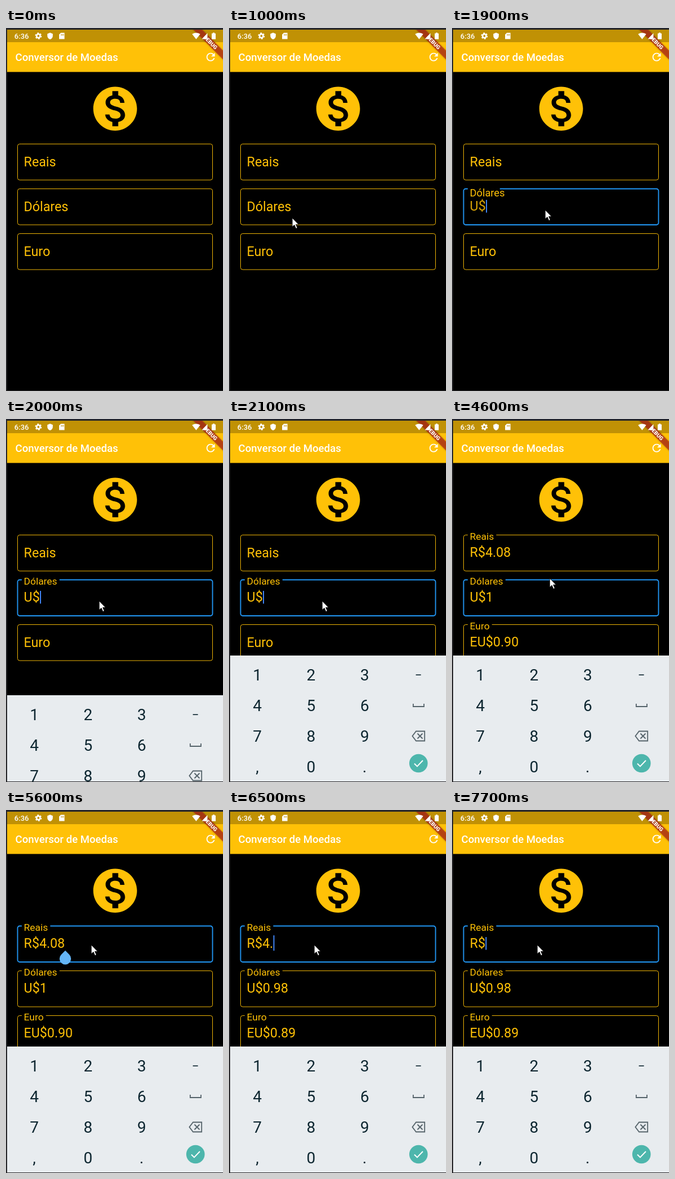
Recreate the animation shown at these times as an HTML page. Size 384x640 px, loop 8000 ms.

```html
<!DOCTYPE html>
<html lang="pt">
<head>
<meta charset="utf-8">
<title>Conversor de Moedas</title>
<style>
  html, body { margin: 0; width: 100%; height: 100%; overflow: hidden; background: #000; }
  svg { display: block; width: 100%; height: 100%; font-family: Roboto, sans-serif; }
  .field text { font-size: 23.2px; fill: #ffc107; }
  .key { font-size: 28px; fill: #0d2630; text-anchor: middle; }
  .line { fill: none; stroke: #55636a; stroke-width: 1.8; }
</style>
</head>
<body>
<svg id="stage" viewBox="0 0 384 640">
  <rect width="384" height="640"/>
  <rect y="25" width="384" height="52.5" fill="#ffc107"/>
  <rect y="3" width="384" height="22" fill="#c09105"/>
  <text x="16.6" y="58" font-size="18.57" font-weight="500" fill="#fff">Conversor de Moedas</text>
  <path transform="translate(351 40) scale(.9286)" fill="#fff" d="M17.65 6.35C16.2 4.9 14.21 4 12 4c-4.42 0-7.99 3.58-7.99 8s3.57 8 7.99 8c3.73 0 6.84-2.55 7.73-6h-2.08c-.82 2.33-3.04 4-5.65 4-3.31 0-6-2.69-6-6s2.69-6 6-6c1.66 0 3.14.69 4.22 1.78L13 11h7V4z"/>
  <path transform="translate(146.7 95.8) scale(3.869)" fill="#ffc107" d="M12 2C6.48 2 2 6.48 2 12s4.48 10 10 10 10-4.48 10-10S17.52 2 12 2zm1.41 16.09V20h-2.67v-1.93c-1.71-.36-3.16-1.46-3.27-3.4h1.96c.1 1.05.82 1.87 2.65 1.87 1.96 0 2.4-.98 2.4-1.59 0-.83-.44-1.61-2.67-2.14-2.48-.6-4.18-1.62-4.18-3.67 0-1.72 1.39-2.84 3.11-3.21V4h2.67v1.95c1.86.45 2.79 1.86 2.85 3.39H14.3c-.05-1.11-.64-1.87-2.22-1.87-1.5 0-2.4.68-2.4 1.64 0 .84.65 1.39 2.67 1.91s4.18 1.39 4.18 3.91c-.02 1.83-1.38 2.83-3.12 3.16z"/>

  <g id="fields"></g>
  <rect id="caret" width="1.9" fill="#448aff"/>
  <path id="handle" fill="#64b5f6" d="M104.9 247.8l7.2 7.2a10.2 10.2 0 1 1-14.4 0z"/>

  <g id="keyboard">
    <rect y="417" width="384" height="223" fill="#e8ecef"/>
    <g id="keys"></g>
    <path class="line" d="M326 502v5h19v-5"/>
    <path class="line" d="M331 550.5H346.2V567.5H331L324.5 559ZM333.5 554.5l9 9m0-9l-9 9"/>
    <circle cx="335.3" cy="607" r="16.3" fill="#4db6ac"/>
    <path d="M328 607.5l5 5 10-10.5" fill="none" stroke="#fff" stroke-width="1.9"/>
  </g>

  <g transform="translate(384 3) rotate(45) scale(.9286)">
    <rect x="-45" y="28" width="90" height="12" fill="#000" opacity=".3" style="filter:blur(2px)"/>
    <rect x="-45" y="28" width="90" height="12" fill="#b71c1c" fill-opacity=".63"/>
    <text y="37.6" font-size="10.2" font-weight="900" text-anchor="middle" fill="#fff">DEBUG</text>
  </g>
  <g fill="#fff">
    <text x="14.8" y="19" font-size="13" font-weight="500">6:36</text>
    <circle cx="57.3" cy="14" r="3.2" fill="none" stroke="#fff" stroke-width="2.6"/>
    <circle cx="57.3" cy="14" r="5" fill="none" stroke="#fff" stroke-width="1.9" stroke-dasharray="2.6 2.636"/>
    <path d="M78 8.3l4.8 2v3.6c0 3-2 5.2-4.8 6-2.800-.8-4.800-3-4.800-6v-3.600z"/>
    <path fill-rule="evenodd" d="M97 8.500h6.500v11h-9.500v-8zm.2 2.500v2.300h1.100v-2.300zm2 0v2.300h1.100v-2.300zm2 0v2.300h1.100v-2.300z"/>
    <path d="M336.500 19.800L329.300 10.800Q336.500 6 343.700 10.800Z"/>
    <path d="M346.500 19.500H356.500V9Z"/>
    <path d="M364 9.500h2v-1.300h3v1.300h2v10.300h-7z"/>
  </g>

  <path id="mouse" fill="#fff" stroke="#000" stroke-width=".8" d="M0 0V15.500L3.700 12.200 6.500 18.500 9 17.400 6.200 11.300H11Z"/>
  <path d="M0 0H384V3H2V639H384V640H0Z" fill="#262629"/>
</svg>
<script>
const LOOP = 8000, STEP = 100, LEFT = 31.6;
const NS = 'http://www.w3.org/2000/svg';
const $ = id => document.getElementById(id);
const clamp = v => Math.max(0, Math.min(1, v));
const within = (t, spans) => spans.some(([a, b]) => t >= a && t < b);

function add(parent, tag, attrs = {}, text = '') {
  const el = document.createElementNS(NS, tag);
  set(el, attrs);
  el.textContent = text;
  return parent.appendChild(el);
}
function set(el, attrs) {
  for (const k in attrs) el.setAttribute(k, attrs[k]);
}
// last [time, value] entry that has been reached
function at(list, t) {
  let value = list[0][1];
  for (const [time, v] of list) if (t >= time) value = v;
  return value;
}

['123−', '456', '789', ',0.'].forEach((row, r) =>
  [...row].forEach((c, i) =>
    add($('keys'), 'text', { class: 'key', x: 50 + 95 * i, y: 461 + 54 * r }, c)));
set($('keys').children[3], { 'font-size': 24, style: 'font-size:22px', y: 459 });

const fields = [
  { label: 'Reais', prefix: 'R$', top: 204.5, float: 3085, focus: [5180, LOOP],
    values: [[0, ''], [3100, '4.08'], [6300, '4.0'], [6500, '4.'], [6700, '4'], [7000, '']],
    blink: [[5200, 5600], [6100, 7200], [7700, LOOP]] },
  { label: 'Dólares', prefix: 'U$', top: 283.5, float: 1786, focus: [1786, 5180],
    values: [[0, ''], [3000, '1'], [6300, '0.98']],
    blink: [[1800, 2600], [3000, 3500], [4000, 4600], [5000, 5200]] },
  { label: 'Euro', prefix: 'EU$', top: 362.5, float: 3085, focus: [LOOP, LOOP],
    values: [[0, ''], [3100, '0.90'], [6300, '0.89']], blink: [] }
];
for (const f of fields) {
  const g = add($('fields'), 'g', { class: 'field' });
  f.border = add(g, 'path', { fill: 'none' });
  f.title = add(g, 'text', {}, f.label);
  f.text = add(g, 'text', { x: LEFT, y: f.top + 38.4 });
  f.unit = add(f.text, 'tspan', {}, f.prefix);
  f.value = add(f.text, 'tspan');
}

// cubic-bezier(.4, 0, .2, 1)
function ease(x) {
  let lo = 0, hi = 1;
  for (let i = 0; i < 20; i++) {
    const s = (lo + hi) / 2;
    if (1.2 * s * (1 - s) ** 2 + .6 * s * s * (1 - s) + s ** 3 < x) lo = s; else hi = s;
  }
  return 3 * lo * lo - 2 * lo ** 3;
}

function outline(top, gapEnd) {
  const l = 20.5, r = 365.5, b = top + 63.5, c = 3.7;
  const arc = (x, y) => `A${c} ${c} 0 0 1 ${x} ${y}`;
  return `M${gapEnd} ${top}H${r - c}${arc(r, top + c)}V${b - c}${arc(r - c, b)}` +
    `H${l + c}${arc(l, b - c)}V${top + c}${arc(l + c, top)}H27.9`;
}

function drawField(f, t) {
  const p = ease(clamp((t - f.float) / 200));
  const scale = 1 - .25 * p;
  const focus = clamp((t - f.focus[0]) / 110) * (1 - clamp((t - f.focus[1]) / 110));
  const mix = (a, b) => Math.round(a + (b - a) * focus);
  const gap = (f.title.getComputedTextLength() * .75 + 7.8) * p;
  set(f.border, {
    d: outline(f.top, 27.9 + gap),
    stroke: `rgb(${mix(255, 33)},${mix(193, 150)},${mix(7, 243)})`,
    'stroke-width': .93 * (1 + focus)
  });
  set(f.title, { transform: `translate(${LEFT} ${f.top + 39.9 - 31.3 * p}) scale(${scale})` });
  set(f.unit, { 'fill-opacity': p });
  const value = at(f.values, t);
  f.value.textContent = value;
  if (within(t, f.blink)) {
    set($('caret'), {
      x: LEFT + f.text.getComputedTextLength() + .4,
      y: f.top + (value ? 16.5 : 19.5),
      height: value ? 27 : 22.5,
      visibility: 'visible'
    });
  }
}

// start time of each run, then one point per step
const runs = [
  [500, [[120, 17], [104, 60], [92, 130], [87, 215], [92, 290], [112, 335], [138, 348], [155, 338], [165, 321]]],
  [3000, [[168, 320], [177, 318], [185, 315], [194, 311], [201, 307], [205, 304]]],
  [4300, [[192, 290], [181, 283]]],
  [4600, [[173, 281], [165, 268], [157, 254], [152, 243], [151, 238]]]
];
const mousePath = runs.flatMap(([start, pts]) => pts.map((p, i) => [start + i * STEP, p]));

function draw(now) {
  const t = Math.floor((now % LOOP) / STEP) * STEP;
  set($('caret'), { visibility: 'hidden' });
  for (const f of fields) drawField(f, t);
  set($('handle'), { visibility: within(t, [[5300, 6300]]) ? 'visible' : 'hidden' });
  set($('keyboard'), {
    visibility: t >= 2000 ? 'visible' : 'hidden',
    transform: `translate(0 ${t < 2100 ? 70 : 0})`
  });
  set($('mouse'), {
    visibility: t >= 500 ? 'visible' : 'hidden',
    transform: `translate(${at(mousePath, t)})`
  });
}

const start = performance.now();
function tick() {
  draw(performance.now() - start);
  requestAnimationFrame(tick);
}
tick();
</script>
</body>
</html>
```
